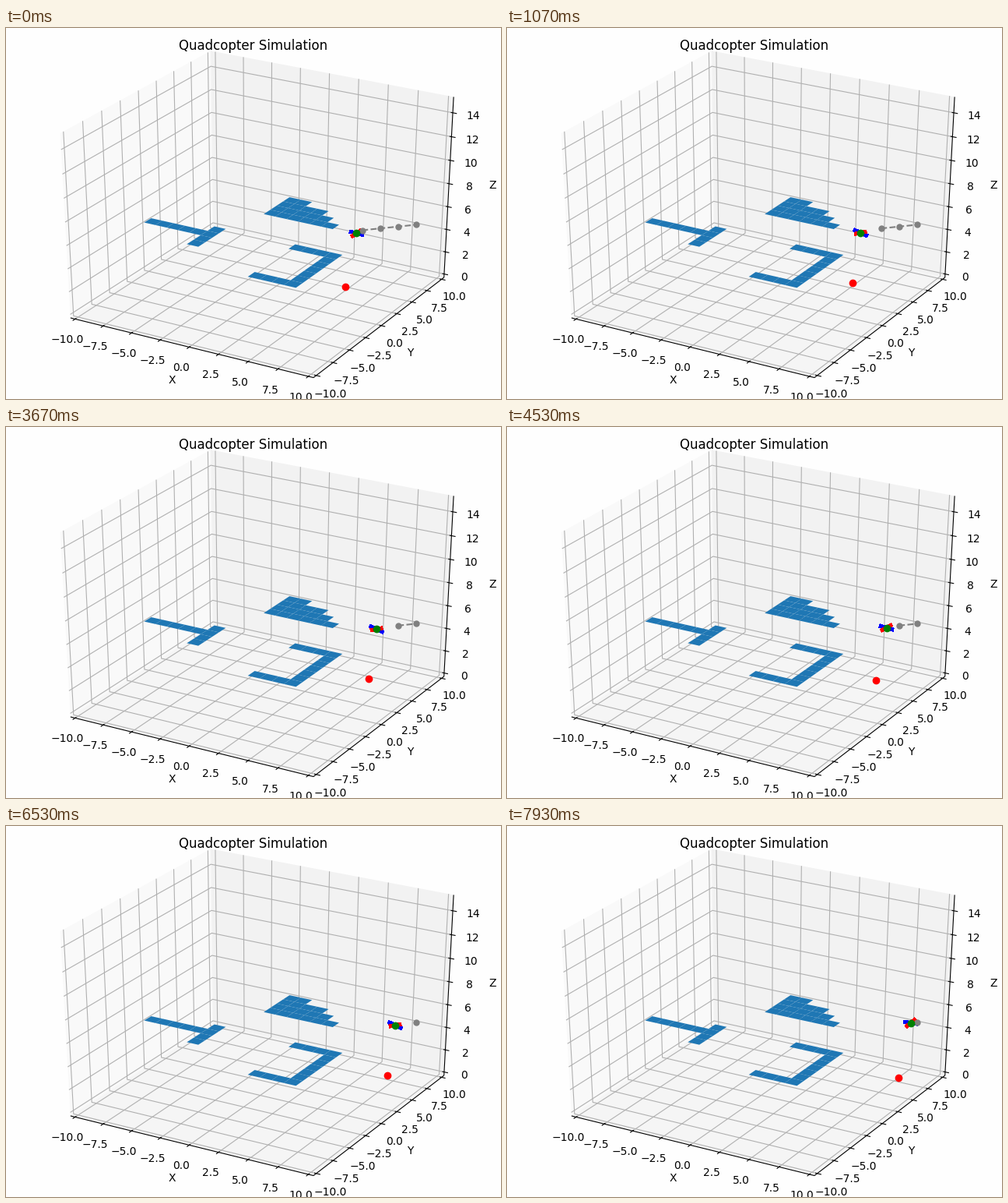
Recreate the animation shown at these times as a matplotlib script. Size 636 by 476 pixels, loop 8 s.

```python
import numpy as np
import matplotlib.pyplot as plt
from matplotlib.animation import FuncAnimation
from matplotlib.collections import LineCollection, PolyCollection

plt.rcParams["font.family"] = "DejaVu Sans"
plt.rcParams["text.kerning_factor"] = 6

W, H, DPI = 636, 476, 100
FRAMES, INTERVAL = 125, 64
STEPS = 120                     # simulation steps in one loop
LO, HI = -25 / 48, 25 / 48      # box limits in unit-cube space
LABEL_PAD, NAME_PAD = 0.057, 0.124

AZIM, ELEV, DIST = np.radians(-60), np.radians(30), 10
CA, SA, CE, SE = np.cos(AZIM), np.sin(AZIM), np.cos(ELEV), np.sin(ELEV)
RIGHT = np.array([-SA, CA, 0])
UP = np.array([-CA * SE, -SA * SE, CE])
TOWARD = np.array([CA * CE, SA * CE, SE])


def project(points):
    """Unit-cube points (centred on 0) to stage pixels, y downwards."""
    p = np.asarray(points, float)
    depth = DIST - p @ TOWARD
    x = (p @ RIGHT / depth + 0.095) * 640 / 0.185 - 2
    y = 478 - (p @ UP / depth + 0.095) * 480 / 0.185
    return np.stack([x, y], axis=-1)


def unit(x, y, z):
    return x / 20, y / 20, (z - 7.5) / 15


fig = plt.figure(figsize=(W / DPI, H / DPI), dpi=DPI, facecolor="#fefefe")
ax = fig.add_axes([0, 0, 1, 1])
ax.set_xlim(0, W)
ax.set_ylim(H, 0)
ax.axis("off")


def draw_panes():
    panes = [
        ([(LO, LO, LO), (LO, HI, LO), (LO, HI, HI), (LO, LO, HI)], "0.975"),
        ([(LO, HI, LO), (HI, HI, LO), (HI, HI, HI), (LO, HI, HI)], "0.95"),
        ([(LO, LO, LO), (HI, LO, LO), (HI, HI, LO), (LO, HI, LO)], "0.9625"),
    ]
    for corners, shade in panes:
        ax.add_patch(plt.Polygon(project(corners), fc=shade, ec="none", zorder=0))


def draw_axes():
    out, inn = 0.2 / 12, 0.1 / 12
    far = HI + LABEL_PAD
    grid, ticks, labels = [], [], []
    for v in np.arange(-10, 10.1, 2.5):
        c = v / 20
        text = f"{v:.1f}".replace("-", "\u2212")
        grid.append([(c, LO, LO), (c, HI, LO), (c, HI, HI)])
        ticks.append([(c, LO - out, LO), (c, LO + inn, LO)])
        labels.append(((c, -far, -far), text))
        grid.append([(HI, c, LO), (LO, c, LO), (LO, c, HI)])
        ticks.append([(HI + out, c, LO), (HI - inn, c, LO)])
        labels.append(((far, c, -far), text))
    for v in range(0, 15, 2):
        c = (v - 7.5) / 15
        grid.append([(LO, LO, c), (LO, HI, c), (HI, HI, c)])
        ticks.append([(HI + out, HI, c), (HI - inn, HI, c)])
        labels.append(((far, far, c), str(v)))

    edges = [
        [(LO, LO, LO), (HI, LO, LO)],
        [(HI, LO, LO), (HI, HI, LO)],
        [(HI, HI, LO), (HI, HI, HI)],
    ]
    ax.add_collection(LineCollection([project(g) for g in grid],
                                     colors="#b0b0b0", linewidths=0.8, zorder=1))
    ax.add_collection(LineCollection([project(e) for e in edges + ticks],
                                     colors="black", linewidths=0.8, zorder=2))
    for pos, text in labels:
        ax.text(*project(pos), text, fontsize=10, ha="center", va="top")

    far = HI + NAME_PAD
    for pos, name in [((0, -far, -far), "X"), ((far, 0, -far), "Y"), ((far, far, 0), "Z")]:
        ax.text(*project(pos), name, fontsize=10, ha="center", va="center")
    ax.text(318, 28, "Quadcopter Simulation", fontsize=12, ha="center", va="baseline")


def draw_obstacles(z=5.07):
    # blocks of unit cells: x from, x to, y from, y to
    blocks = [
        (-9, -4, -2, -1), (-4, -3, -4, 0),
        (-2, 4, 4, 5), (-2, 3, 5, 6), (-2, 2, 6, 7), (-2, 0, 7, 8),
        (3, 7, -7, -6), (6, 7, -6, -1), (3, 7, -1, 0),
    ]
    cells = []
    for x0, x1, y0, y1 in blocks:
        for x in range(x0, x1):
            for y in range(y0, y1):
                ring = [(x, y), (x + 1, y), (x + 1, y + 1), (x, y + 1)]
                cells.append(project([unit(a, b, z) for a, b in ring]))
    ax.add_collection(PolyCollection(cells, facecolors="#1f77b4",
                                     edgecolors="none", zorder=3))


draw_panes()
draw_axes()
draw_obstacles()

arm_b, = ax.plot([], [], color="blue", lw=3, antialiased=False, zorder=5)
arm_r, = ax.plot([], [], color="red", lw=3, antialiased=False, zorder=6)
route, = ax.plot([], [], "o--", color="gray", ms=5, lw=1.5, zorder=7)
hub, = ax.plot([], [], "o", color="green", ms=6, zorder=8)
ball, = ax.plot([], [], "o", color="red", ms=6, zorder=8)

HOP = 42                        # steps from one waypoint to the next
FIRST_REACHED = 5
K = np.arange(4)
ROUTE_X, ROUTE_Y = 457.5 + 23 * K, 259.5 - 2.35 * K


def update(i):
    step = min(round((i + 0.5) * INTERVAL * STEPS / 8000), STEPS - 1)
    # +1 while setting off for a waypoint, -1 while arriving at it
    sway = np.cos(2 * np.pi * (step - HOP / 3) / HOP)

    x = 448.7 + 0.56 * step - 3.5 * sway
    y = 263.6 - 0.157 * (x - 449)
    blue_dy, red_dy = 2.2 + sway, 2.5 - 1.4 * sway
    red_dx = 5.2 + 0.5 * sway
    arm_b.set_data([x - 7, x + 7], [y - blue_dy, y + blue_dy])
    arm_r.set_data([x - red_dx, x + red_dx], [y + red_dy, y - red_dy])
    hub.set_data([x], [y])

    # the spot on the floor under the tilting craft
    ball.set_data([x - 13 + 3 * sway], [y + 67 - 3 * sway])

    reached = (step + HOP - FIRST_REACHED) // HOP
    route.set_data(ROUTE_X[reached:], ROUTE_Y[reached:])
    return arm_b, arm_r, route, hub, ball


anim = FuncAnimation(fig, update, frames=FRAMES, interval=INTERVAL,
                     init_func=lambda: update(0), repeat=True, repeat_delay=0)
plt.show()
```
